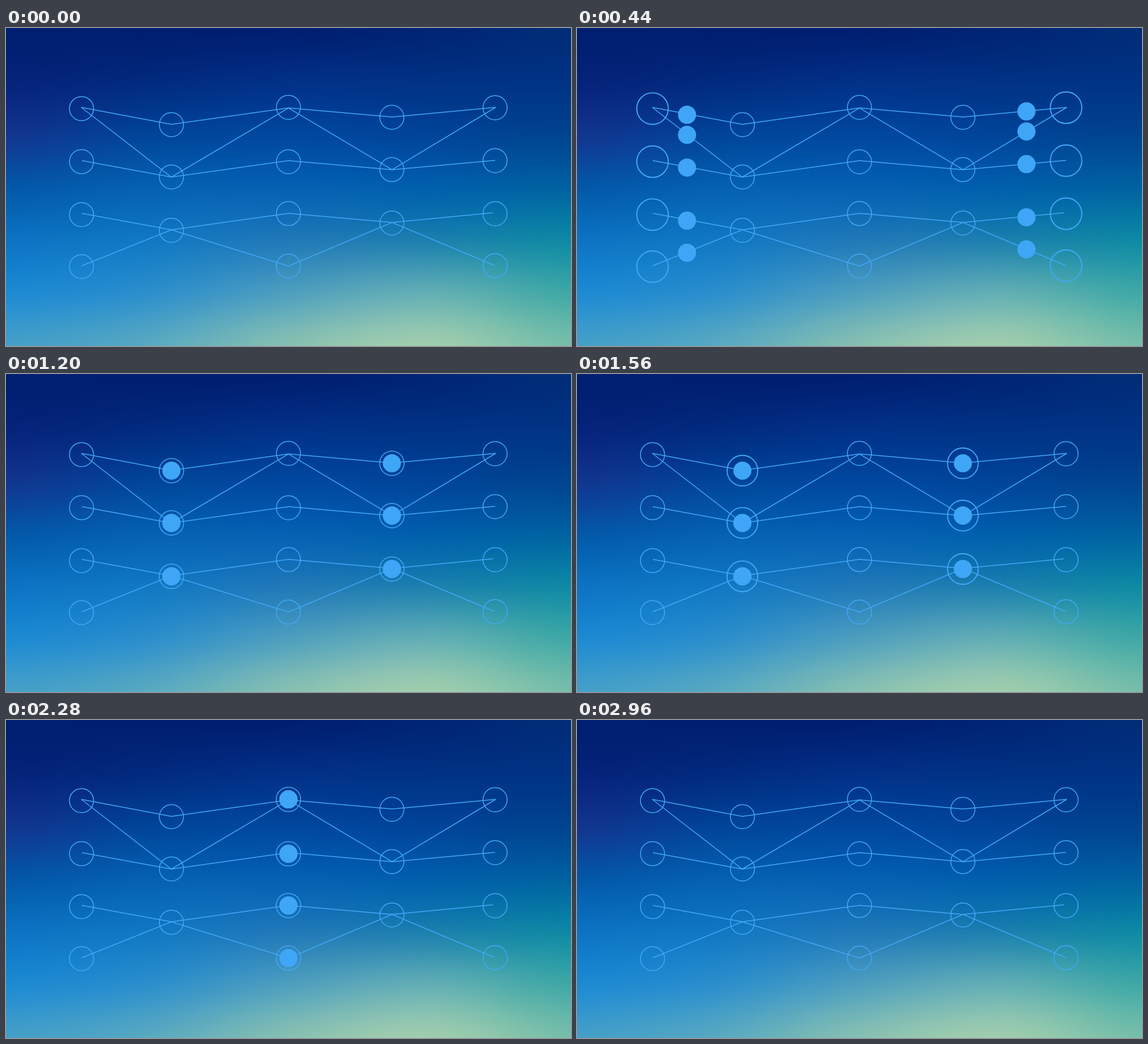
Recreate the animation shown at these times as an HTML page with a canvas. Size 998 by 561 pixels, loop 3.52 s.

```html
<!DOCTYPE html>
<html lang="en">
<head>
<meta charset="utf-8">
<title>Network pulses</title>
<style>
  html, body { margin: 0; width: 100%; height: 100%; overflow: hidden; background: #0560b2; }
  canvas { display: block; }
</style>
</head>
<body>
<canvas id="stage" width="998" height="561"></canvas>
<script>
const W = 998, H = 561, LOOP = 3520, STEP = 40;
const BLUE = '#43a8f8', DOT = '#3fa6f7';
const RING = 21.3, RING_GROWTH = 0.32, DOT_RADIUS = 16;
const ctx = document.getElementById('stage').getContext('2d');

// Backdrop colours: five columns, each from top to bottom.
const mesh = [
  '001f70 05237a 11358f 0457a8 0c73c2 1d8ad2 449fc8',
  '001e70 012a7e 004498 0560b0 1178c2 2c8fcb 58a9c1',
  '001e70 013087 00479d 0560b2 2079b8 4e9fbe 86c0b2',
  '002474 003284 004498 005fab 1c80ae 62aeb4 9fcdae',
  '002d78 003384 00448e 0062a0 0f89a4 3fa8a6 76beaa'
].map(col => col.split(' ').map(hex =>
  [0, 2, 4].map(i => parseInt(hex.slice(i, i + 2), 16))));

// Catmull-Rom weights for a position u in 0..1 along n points.
function spline(n, u) {
  const p = u * (n - 1), i = Math.min(Math.floor(p), n - 2), f = p - i;
  const weights = [
    (-f + 2 * f * f - f ** 3) / 2,
    (2 - 5 * f * f + 3 * f ** 3) / 2,
    (f + 4 * f * f - 3 * f ** 3) / 2,
    (f ** 3 - f * f) / 2
  ];
  return weights.map((w, k) => [Math.max(0, Math.min(n - 1, i + k - 1)), w]);
}
const blend = (points, weights, channel) =>
  weights.reduce((sum, [i, w]) => sum + points[i][channel] * w, 0);

function makeBackdrop() {
  const canvas = document.createElement('canvas');
  canvas.width = W;
  canvas.height = H;
  const c = canvas.getContext('2d'), image = c.createImageData(W, H);
  const across = Array.from({ length: W }, (_, x) => spline(mesh.length, x / (W - 1)));
  for (let y = 0, o = 0; y < H; y++) {
    const down = spline(mesh[0].length, y / (H - 1));
    const row = mesh.map(col => [0, 1, 2].map(ch => blend(col, down, ch)));
    for (let x = 0; x < W; x++) {
      for (let ch = 0; ch < 3; ch++) image.data[o++] = blend(row, across[x], ch);
      image.data[o++] = 255;
    }
  }
  c.putImageData(image, 0, 0);
  return canvas;
}
const backdrop = makeBackdrop();

const columns = [
  { x: 133.4, ys: [142.2, 235.8, 329.2, 421] },
  { x: 292.2, ys: [170.5, 262.7, 356.9] },
  { x: 498.9, ys: [140, 236, 327.3, 420] },
  { x: 681.6, ys: [157.5, 249.8, 344] },
  { x: 863.9, ys: [140.6, 234, 327.6, 419.4] }
];
const paths = [
  [133, 140, 292, 170, 499, 141, 682, 157, 865, 140],
  [133, 140, 292, 263, 499, 141, 682, 250, 865, 140],
  [134, 234, 292, 263, 499, 234, 682, 250, 864, 233.5],
  [134, 327, 292, 356, 499, 327, 682, 343, 860, 326],
  [134, 419.5, 292, 356, 499, 420, 682, 343, 863, 419]
];
// Rows linked from the edge to the inner column, and from there to the middle.
const outerLinks = [[0, 0], [0, 1], [1, 1], [2, 2], [3, 2]];
const innerLinks = outerLinks.map(([a, b]) => [b, a]);

const progress = (t, start, end) => Math.max(0, Math.min(1, (t - start) / (end - start)));
const smooth = u => u * u * (3 - 2 * u);

// Timing curve with handles (a, 0) and (b, 1).
function ease(u, a, b) {
  let lo = 0, hi = 1;
  for (let i = 0; i < 24; i++) {
    const s = (lo + hi) / 2, r = 1 - s;
    if (3 * r * r * s * a + 3 * r * s * s * b + s ** 3 < u) lo = s; else hi = s;
  }
  return smooth(lo);
}

function pulse(t, start) {
  const u = progress(t, start, start + 640);
  return 1 + RING_GROWTH * smooth(1 - Math.abs(2 * u - 1));
}

function drawRings(t) {
  columns.forEach(({ x, ys }, i) => {
    const scale = pulse(t, 80 + 1080 * Math.min(i, 4 - i));
    ctx.lineWidth = 1.5 * scale;
    for (const y of ys) {
      ctx.beginPath();
      ctx.arc(x, y, RING * scale, 0, 2 * Math.PI);
      ctx.stroke();
    }
  });
}

function drawLines() {
  ctx.lineWidth = 1.5;
  for (const p of paths) {
    ctx.beginPath();
    for (let i = 0; i < p.length; i += 2) ctx.lineTo(p[i], p[i + 1]);
    ctx.stroke();
  }
}

function drawDots(t) {
  const radius = DOT_RADIUS * smooth(progress(t, 0, 320)) * smooth(1 - progress(t, 2640, 2960));
  if (!radius) return;
  const inner = t >= 1640;
  const u = inner ? ease(progress(t, 1640, 2160), 0.57, 0.33)
                  : ease(progress(t, 80, 1040), 0.49, 0.3);
  const routes = inner ? [[1, 2], [3, 2]] : [[0, 1], [4, 3]];
  for (const [from, to] of routes) {
    const a = columns[from], b = columns[to];
    for (const [i, j] of inner ? innerLinks : outerLinks) {
      ctx.beginPath();
      ctx.arc(a.x + (b.x - a.x) * u, a.ys[i] + (b.ys[j] - a.ys[i]) * u, radius, 0, 2 * Math.PI);
      ctx.fill();
    }
  }
}

const began = performance.now();
function draw() {
  const t = Math.floor((performance.now() - began) % LOOP / STEP) * STEP;
  ctx.drawImage(backdrop, 0, 0);
  ctx.strokeStyle = BLUE;
  ctx.fillStyle = DOT;
  drawRings(t);
  drawLines();
  drawDots(t);
  requestAnimationFrame(draw);
}
draw();
</script>
</body>
</html>
```
